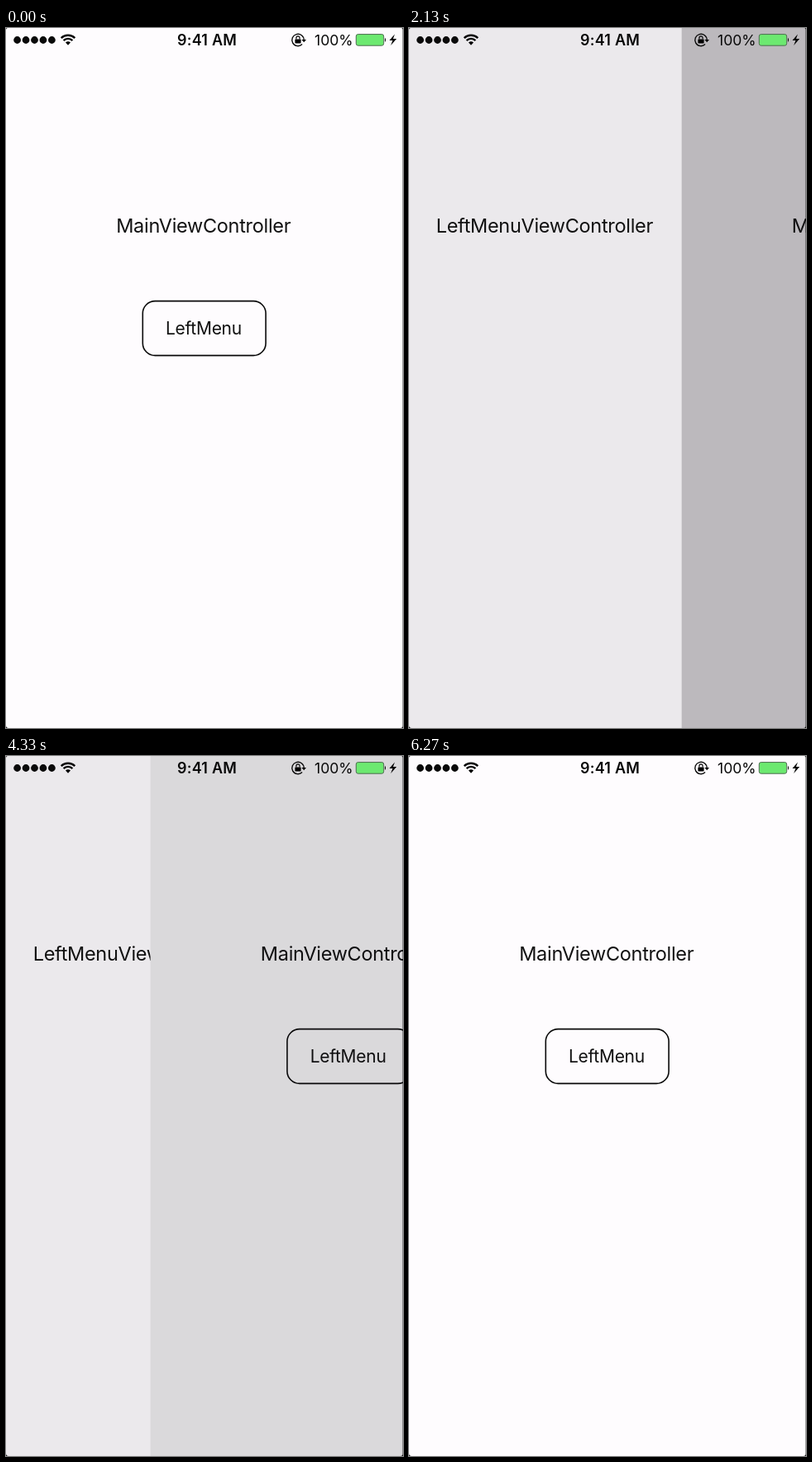
These frames come from a looping animation (480x845 px, 6340 ms). An HTML page:

```html
<!DOCTYPE html>
<html lang="en">
<head>
<meta charset="utf-8">
<title>Left menu</title>
<style>
  html, body { margin: 0; height: 100%; overflow: hidden; background: #fefcfe; }
  svg { display: block; width: 100vw; height: 100vh; }
  text { font-family: Inter, "Liberation Sans", sans-serif; fill: #111; }
  .label { font-size: 23.5px; letter-spacing: -.013em; }
  .button { font-size: 21px; letter-spacing: -.013em; }
  .status text { font-size: 17.6px; fill: #080808; }
  .status .clock { font-size: 18px; font-weight: 600; letter-spacing: .012em; }
  .line { fill: none; stroke: #0a0a0a; }
</style>
</head>
<body>
<svg viewBox="0 0 480 845">
  <rect width="480" height="845" fill="#ebe9ec"/>
  <text class="label" x="32.700" y="247">LeftMenuViewController</text>

  <g id="main">
    <rect width="480" height="845" fill="#fefcfe"/>
    <text class="label" x="133.2" y="247">MainViewController</text>
    <rect class="line" x="165.3" y="329.6" width="148.8" height="65.8" rx="15" stroke-width="1.6"/>
    <text class="button" x="193" y="370.3">LeftMenu</text>
    <rect id="dim" width="480" height="845" fill="#060308" opacity="0"/>
  </g>

  <g class="status">
    <path d="M13.6 14.5h42" class="line" stroke-width="8.800" stroke-linecap="round" stroke-dasharray="0 10.45"/>
    <path class="line" stroke-width="2.4" d="M66.7 12.2a11.8 11.8 0 0 1 16.6 0M69.6 15.1a7.6 7.6 0 0 1 10.8 0"/>
    <path d="M75 20.8l-3-3.2a4.4 4.4 0 0 1 6 0z"/>
    <text class="clock" x="243" y="21" text-anchor="middle">9:41 AM</text>

    <path class="line" stroke-width="1.4" d="M360.2 14.5a7.2 7.2 0 1 0-2.1 5.1"/>
    <path d="M357.4 14h5.6l-2.8 3.2z"/>
    <rect x="349.4" y="13.4" width="7.2" height="5" rx=".6"/>
    <path class="line" stroke-width="1.2" d="M350.9 13.6v-1.6a2.1 2.1 0 0 1 4.2 0v1.6"/>

    <text x="373" y="21">100%</text>
    <rect x="423.3" y="7.6" width="33.4" height="13.6" rx="2.4" fill="#6ce970" stroke="#4d6b50"/>
    <path d="M458 11.8q2.2 2.6 0 5.2z"/>
    <path d="M470 7.5l-6.5 7.6h4l-2.3 5.9 7-8h-4.2z"/>
  </g>

  <path d="M479.5 0v845" stroke="#000" stroke-opacity=".35"/>
  <path d="M0 842v3h3q-3 0-3-3zM480 842v3h-3q3 0 3-3zM0 2v-2h2q-2 0-2 2zM480 2v-2h-2q2 0 2 2z"/>
</svg>
<script>
  const LOOP = 6340, FPS = 15, MENU_WIDTH = 330, MAX_DIM = 0.268;
  const main = document.getElementById('main');
  const dim = document.getElementById('dim');

  // cubic-bezier(.42, 0, .58, 1), solved by bisection
  function easeInOut(u) {
    if (u <= 0) return 0;
    if (u >= 1) return 1;
    let low = 0, high = 1, s;
    for (let i = 0; i < 24; i++) {
      s = (low + high) / 2;
      const x = 1.26 * (1 - s) ** 2 * s + 1.74 * (1 - s) * s * s + s ** 3;
      if (x < u) low = s; else high = s;
    }
    return s * s * (3 - 2 * s);
  }

  const ramp = (t, start, duration) => easeInOut((t - start) / duration);

  function draw(now) {
    // The picture advances in steps of 1/15 s
    const t = Math.floor((now % LOOP + 4) * FPS / 1000) * 1000 / FPS;
    const open = ramp(t, 1682.6, 461.7) - ramp(t, 4106.3, 470);
    main.setAttribute('transform', `translate(${open * MENU_WIDTH})`);
    dim.setAttribute('opacity', open * MAX_DIM);
  }

  const start = performance.now();
  function tick() {
    draw(performance.now() - start);
    requestAnimationFrame(tick);
  }
  tick();
</script>
</body>
</html>
```
